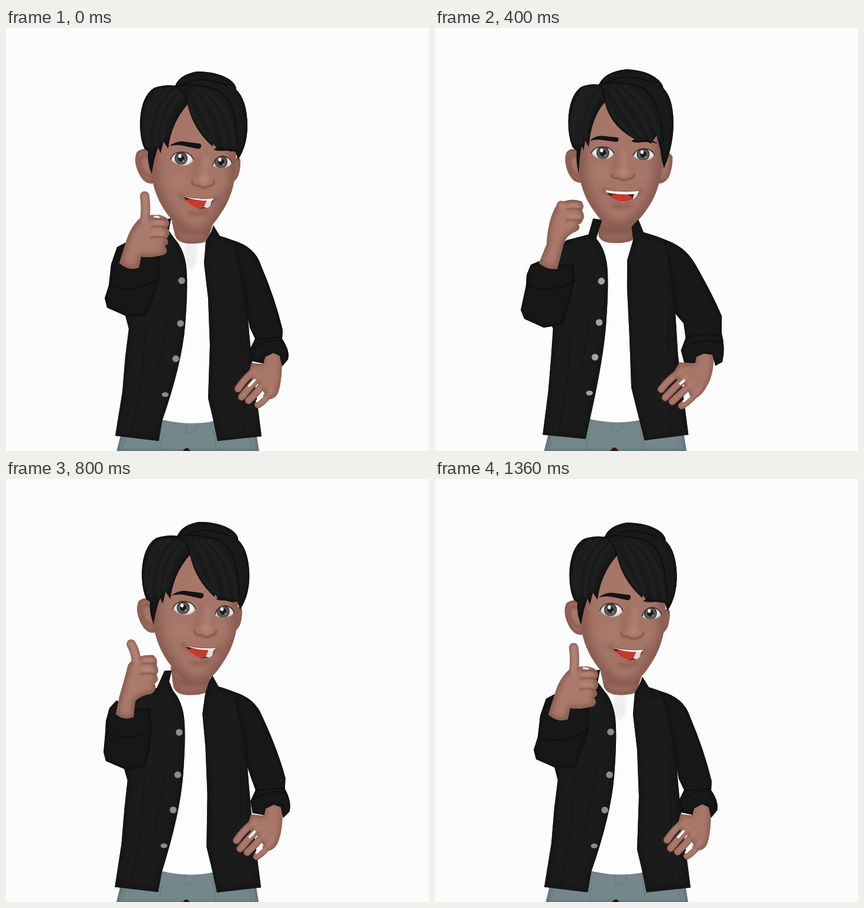
An HTML page with a canvas that plays this animation: 720x720 px, repeating every 1.44 s.

```html
<!DOCTYPE html>
<html lang="en">
<head>
<meta charset="utf-8">
<title>Thumbs up</title>
<style>
html, body { margin: 0; height: 100%; overflow: hidden; background: #fcfcfc; }
canvas { display: block; width: 100vw; height: 100vh; }
</style>
</head>
<body>
<canvas id="stage" width="720" height="720"></canvas>
<script>
const ctx = document.getElementById('stage').getContext('2d');
const LOOP = 1440, STEP = 80;

// Motion tracks, one value per time in TIMES
const TIMES = [0, 160, 240, 400, 640, 800, 1040, 1360, 1440];
const TRACKS = {
  body:  [0, 1.08, 1, .9, .46, .24, .06, 0, 0],
  bodyY: [0, 0, 0, 0, 0, 1, 1.5, .5, 0],
  head:  [0, 1.04, 1, .65, -.02, -.03, -.02, 0, 0],
  headX: [0, 0, 0, 2, 3, 3, 3, .7, 0],
  headY: [0, 0, 0, -3, -5, -3, 1.5, .5, 0],
  arm:   [0, 1, 1, 2, 3, 4, 4.8, 5, 5],
  armY:  [0, 0, 0, 0, 0, 0, 5, 1, 0]
};

// Each torso part: turned pose, front pose
const TORSO = {
  pants: ['M196 690L188 722L431 722L426 690L352 664L264 664Z',
          'M193 690L185 722L428 722L423 690L348 664L260 664Z'],
  seams: ['M306 674L308 690Q326 688 327 674M268 690Q262 706 264 722M352 684Q358 704 358 722M204 698L196 722M414 698L420 722',
          'M300 672L302 688Q320 686 321 672M262 690Q256 706 258 722M348 684Q354 704 354 722M201 698L193 722M411 698L417 722'],
  notch: ['M300 722Q308 708 315 722Z', 'M297 722Q305 706 313 722Z'],
  tee: ['M284 358L342 358L354 669Q312 678 262 666Z', 'M272 356L342 356L349 667Q306 676 260 665Z'],
  neck: ['M280 318L287 350Q290 367 315 367Q341 367 343 360L356 322Z',
         'M281 318L277 350Q278 366 305 366Q336 366 340 355L338 318Z'],
  left: ['M281 324L270 326L255 356L230 358L204 366L185 420L209 512L203 560L198 620L186 694L260 703L266 668Q300 570 305 505Q311 430 306 400Q301 374 288 360L277 345Z',
         'M285 327L269 324L262 351L225 361L190 379L168 432L200 512L197 560L192 620L183 692L256 699L263 668Q286 560 290 500Q295 430 291 400Q287 374 273 358L280 340Z'],
  right: ['M353 336L364 354Q400 364 420 382L408 440L414 520L419 570L435 695L360 703L352 664L344 630L347 540L344 460L337 400L340 364L350 345Z',
          'M345 324L354 347Q398 359 422 376L405 430L409 487L413 555L431 692L356 702L347 666L333 610L329 520L325 440L326 395L337 360L333 338Z'],
  folds: ['M283 358Q276 358 275 352M342 364L376 372L362 352M238 500L232 590L214 690M400 480L404 690M276 490L255 600',
          'M273 362Q266 356 262 351M336 362L372 371L354 347M230 500L226 590L210 690M396 480L400 690M262 490L246 600'],
  sleeve: ['M385 361Q424 372 434 404Q458 460 471 514L470 529Q484 550 480 564L470 576L466 558L455 553L441 560L438 571L418 567L415 547L424 529L415 510L411 488L406 450Z',
           'M390 360Q424 370 443 400Q476 456 490 488L490 518Q496 546 490 569L478 575L473 556L458 554L445 560L443 571L425 570L419 549L427 527L424 502L409 486L403 430Z'],
  cuff: ['M424 530Q445 529 470 526M419 546Q445 528 471 532', 'M427 527Q446 518 488 523M421 546Q452 526 490 536'],
  palm: ['M436 572L439 552L455 545L469 552Q471 592 465 615Q461 632 446 632L430 606L412 592L418 570Z',
         'M443 572L443 552L458 546L475 552Q476 588 463 608Q452 628 438 632L422 606L402 592L416 569Z'],
  fingers: ['M425 582Q408 594 395 614M432 592Q416 610 401 628M441 602Q426 622 413 634M454 612Q444 632 429 641',
            'M422 582Q400 594 384 615M430 592Q408 610 391 629M440 602Q420 620 403 636M452 612Q436 632 419 643'],
  gaps: ['M423 599L414 609M436 627L427 635', 'M424 600L418 605M432 627L423 635']
};
const BUTTONS = [[299, 430, 281.5, 431], [297, 503, 277.5, 501], [289, 563, 270.5, 560], [271, 624, 262, 621]];

const HEAD = {
  earL: ['M250 214Q236 200 223 211Q216 226 226 247Q236 268 252 264Z', 'M243 218Q230 204 222 216Q216 228 224 250Q232 268 246 267Z'],
  earR: ['M388 224Q397 216 399 226Q399 242 395 252Q390 262 382 264Z', 'M380 220Q396 206 404 221Q405 240 396 260Q386 273 374 269Z'],
  face: ['M246 112L249 258Q256 296 282 326Q298 350 324 349Q346 347 364 318Q390 282 391 235L394 112Z',
         'M240 112L242 255Q246 290 272 322Q284 338 308 339Q334 338 350 316Q376 284 380 240L384 112Z'],
  inner: ['M241 218Q225 214 229 234Q234 250 245 252', 'M236 221Q223 219 227 238Q231 252 238 256'],
  nose: ['M316 260Q318 270 328 268Q337 275 346 269Q355 268 354 260', 'M289 247Q290 256 300 253Q309 260 317 254Q328 255 328 247'],
  bridge: ['M328 220Q322 240 318 254', 'M297 208Q294 232 291 242'],
  ridge: ['M340 222Q340 240 338 254', 'M309 208Q309 226 309 240'],
  smile: ['M296 284Q300 286 303 290M360 289Q358 294 354 295M312 315Q328 320 342 313', 'M277 274Q280 274 284 279M344 274Q342 276 337 280M294 300Q310 305 326 300'],
  mouth: ['M300 286Q326 293 355 290Q350 309 330 309Q312 306 300 286Z', 'M280 275Q309 279 341 275Q333 295 310 295Q290 294 280 275Z'],
  teeth: ['M300 284L355 288L351 294Q325 295 303 287Z', 'M280 273L341 273L336 281Q309 284 284 281Z'],
  side: ['M342 292L352 290L346 307L337 305Z', 'M336 277L341 276L336 288L333 288Z'],
  eyeL: ['M281 224Q283 212 300 211Q315 212 319 224Q314 234 300 234Q287 232 281 224Z', 'M256 212Q260 202 275 202Q290 203 294 212Q288 222 275 222Q261 221 256 212Z'],
  eyeR: ['M352 234Q355 220 369 218Q382 220 384 230Q380 238 366 238Q358 238 352 234Z', 'M326 213Q331 203 346 203Q360 204 364 213Q360 223 347 223Q333 222 326 213Z'],
  lidL: ['M280 224Q284 211 300 211Q315 212 319 224', 'M255 212Q260 202 275 202Q290 203 294 212'],
  lidR: ['M352 233Q356 219 369 218Q382 220 385 230', 'M326 213Q331 203 346 203Q360 204 365 213'],
  browL: ['M278 201Q288 193 300 193L331 197Q335 203 328 206L300 200Q290 198 278 201Z', 'M252 192Q260 183 272 183L297 185Q301 190 296 192L272 190Q262 189 252 192Z'],
  browR: ['M354 207Q358 201 368 203Q384 205 392 211Q380 208 370 209Q358 210 354 207Z', 'M321 190Q326 184 342 184Q360 185 369 194Q354 190 342 191Q328 193 321 190Z']
};
const IRISES = { eyeL: [298, 222, 276, 212], eyeR: [366, 228, 345, 213] };

const HAIR = {
  mass: ['M248 248Q240 228 242 210L236 206Q228 190 228 160Q230 116 252 102Q268 96 288 98Q296 79 325 74Q360 74 381 88Q392 96 392 105Q410 122 411 165Q411 200 395 224L391 212L389 209L383 210L360 205L352 197L352 202Q318 172 309 130Q281 162 276 205L268 193L263 213L259 203Q252 220 248 248Z',
         'M240 249Q236 228 238 212L230 203Q223 186 223 160Q224 116 244 101Q258 95 271 97Q281 74 323 70Q354 72 370 85Q382 94 384 103Q400 120 400 160Q401 200 384 248L380 232L377 205L371 170L368 194L358 189L348 192Q288 176 275 126Q253 152 251 203L246 192L244 208L242 200Q239 215 240 249Z'],
  strands: ['M309 122Q322 160 350 194M318 108Q340 140 358 200M328 106Q366 138 374 203M340 106Q384 136 388 204M300 110Q268 144 266 192M290 106Q252 138 256 200M276 104Q240 134 242 200M264 104Q234 130 235 185',
            'M276 118Q292 164 340 188M286 102Q310 150 352 186M296 98Q340 140 364 188M312 98Q362 134 374 180M270 106Q242 144 248 194M262 102Q234 138 242 196M254 102Q230 134 234 195M246 104Q228 130 229 185'],
  parts: ['M288 99Q322 92 362 106Q392 126 394 200M300 98Q330 78 376 98M309 130Q305 108 288 99',
          'M271 97Q306 86 346 102Q378 126 382 190M284 92Q320 74 366 94M275 126Q277 106 271 97']
};

// Raised arm poses: thumb up, drawn back, closed fist, thumb rising, thumb out
const HANDS = [
  'M193 400L203 368Q212 335 232 321Q268 313 276 327Q280 335 274 340Q282 351 273 358Q280 367 270 371Q278 381 268 386Q245 392 230 389L226 408Q208 414 193 400Z',
  'M162 460L170 435Q180 405 189 382Q205 358 238 364Q246 372 241 380Q247 390 239 396Q244 405 236 409Q240 420 226 426Q212 424 202 432L191 463Q176 466 162 460Z',
  'M177 400L190 368Q192 325 208 300Q230 288 249 295Q256 304 250 310Q257 322 250 329Q250 333 244 334Q250 343 236 348Q222 355 219 368L208 410Q190 412 177 400Z',
  'M181 388L192 350Q193 320 200 282Q215 268 240 271Q250 278 247 288Q252 298 247 307Q248 312 243 314Q250 325 238 331Q228 340 222 356L213 391Q198 397 181 388Z',
  'M187 400L193 370Q202 340 208 316Q222 298 251 300Q260 308 256 316Q262 327 256 333Q262 343 253 348Q258 360 246 366Q230 368 220 378L217 405Q200 412 187 400Z'
];
const THUMBS = ['M236 328Q239 306 236 286', 'M214 370Q213 357 213 348', 'M224 308Q218 303 215 302', 'M213 288Q209 278 208 273', 'M222 312Q221 294 213 281'];
const SLEEVES = [
  'M204 365L189 373L179 402L175 438L168 460L172 476L206 491L238 490L250 462L262 425L262 388L228 385Z',
  'M166 432L148 452L142 470L142 488L137 510L142 524L168 537L207 538L214 505L222 470L214 440L192 440Z',
  'M177 397L163 403L156 420L155 438L146 480L152 495L185 510L218 505L228 470L238 430L236 400L208 405Z',
  'M182 377L170 383L163 402L163 425L157 465L162 480L196 493L229 488L236 460L242 430L242 390L213 388Z',
  'M188 377L176 390L170 412L169 432L166 465L170 480L207 496L236 490L244 465L248 430L246 390L217 390Z'
];

const NUM = /-?\d+(\.\d+)?/g;
const lerp = (a, b, k) => a + (b - a) * k;
const numbers = path => path.match(NUM).map(Number);
function mix(a, b, k) {
  const end = numbers(b);
  let i = 0;
  return a.replace(NUM, n => lerp(+n, end[i++], k).toFixed(2));
}
function poseAt(t) {
  let i = 0;
  while (t >= TIMES[i + 1]) i++;
  const k = (t - TIMES[i]) / (TIMES[i + 1] - TIMES[i]);
  return Object.fromEntries(Object.entries(TRACKS).map(([name, v]) => [name, lerp(v[i], v[i + 1], k)]));
}
const blend = (set, k) => Object.fromEntries(Object.entries(set).map(([name, pair]) => [name, mix(...pair, k)]));

function line(path, color, width) {
  ctx.strokeStyle = color;
  ctx.lineWidth = width;
  ctx.stroke(new Path2D(path));
}
function fill(path, color) {
  ctx.fillStyle = color;
  ctx.fill(new Path2D(path));
}
function inside(path, draw) {
  ctx.save();
  ctx.clip(new Path2D(path));
  draw();
  ctx.restore();
}
function soft(blur, draw) {
  ctx.save();
  ctx.filter = `blur(${blur}px)`;
  draw();
  ctx.restore();
}
function shaded(path, color, edge, width) {
  fill(path, color);
  inside(path, () => soft(width / 3, () => line(path, edge, width)));
}
function oval(x, y, rx, ry, color) {
  ctx.fillStyle = color;
  ctx.beginPath();
  ctx.ellipse(x, y, rx, ry, 0, 0, 7);
  ctx.fill();
}
function at(x, y, draw) {
  ctx.save();
  ctx.translate(x, y);
  draw();
  ctx.restore();
}

function drawTorso(k) {
  const p = blend(TORSO, k);
  shaded(p.pants, '#74878b', '#617276', 8);
  line(p.seams, '#65777b', 1.2);
  fill(p.notch, '#261715');
  fill(p.tee, '#fdfdfd');
  const shadow = Math.max(0, 1 - k * 5);
  inside(p.tee, () => soft(2, () => oval(314, 386, 11, 24, `rgba(215,215,215,${.4 * shadow})`)));
  shaded(p.neck, '#a07063', '#875a4f', 12);
  soft(5, () => oval(lerp(320, 308, k), 343, 28, 10, 'rgba(105,63,53,.45)'));
  for (const side of [p.left, p.right]) shaded(side, '#1b1b1b', '#151515', 12);
  line(p.folds, '#121212', 1);
  for (const [i, [x, y, x2, y2]] of BUTTONS.entries())
    oval(lerp(x, x2, k), lerp(y, y2, k), 5.8, i < 3 ? 5.8 : 4, k > .7 ? '#a2a2a2' : '#8c8c8c');
  line(p.fingers, '#87594e', 12.5);
  line(p.fingers, '#a07063', 10);
  shaded(p.palm, '#a87769', '#8d6054', 9);
  soft(2, () => line(p.fingers, '#b08072', 4));
  line(p.gaps, '#fcfcfc', 4);
  shaded(p.sleeve, '#181818', '#111', 6);
  line(p.cuff, '#0b0b0b', 1.2);
}

function drawEye(name, p, k) {
  const [x, y, x2, y2] = IRISES[name];
  const cx = lerp(x, x2, k), cy = lerp(y, y2, k);
  shaded(p[name], '#f3f1f0', '#c9c1be', 4);
  inside(p[name], () => {
    oval(cx, cy, 11, 11, '#3a3a3a');
    oval(cx, cy + 1, 9.5, 9.5, '#5b5b5b');
    oval(cx, cy, 5.5, 5.5, '#1c1c1c');
    oval(cx - 2, cy - 4, 2.6, 3.2, '#fff');
    oval(cx + 4, cy + 4, 1.6, 1.6, '#999');
  });
}

function drawFace(k) {
  const p = blend(HEAD, k);
  for (const ear of [p.earL, p.earR]) shaded(ear, '#a77769', '#87594e', 9);
  soft(2, () => line(p.inner, '#83564b', 4));
  shaded(p.face, '#a57568', '#885a4f', 22);
  const nx = lerp(337, 309, k), ny = lerp(258, 244, k);
  inside(p.face, () => soft(8, () => {
    oval(nx - 40, ny + 2, 20, 14, 'rgba(184,134,120,.35)');
    oval(nx + 34, ny + 4, 13, 13, 'rgba(184,134,120,.25)');
    oval(nx - 10, ny + 72, 20, 9, 'rgba(180,130,116,.35)');
    oval(nx - 6, ny - 80, 28, 24, 'rgba(174,126,112,.3)');
  }));
  soft(3, () => {
    line(p.bridge, 'rgba(112,70,60,.25)', 5);
    line(p.ridge, 'rgba(190,142,128,.5)', 7);
    oval(nx, ny, 9, 7, 'rgba(192,142,127,.6)');
    line(p.smile, '#815247', 4);
  });
  soft(1.2, () => line(p.nose, '#7b5045', 2.4));
  line(p.mouth, '#8b5950', 2.5);
  fill(p.mouth, '#5a1b18');
  inside(p.mouth, () => {
    oval(lerp(322, 309, k), lerp(299, 291, k), 20, 9, '#c33b2e');
    fill(p.side, '#dedcdc');
    fill(p.teeth, '#faf9f9');
    line(p.mouth, 'rgba(238,222,216,.7)', 1.6);
  });
  drawEye('eyeL', p, k);
  drawEye('eyeR', p, k);
  for (const lid of [p.lidL, p.lidR]) line(lid, '#3b2723', 1.5);
  for (const brow of [p.browL, p.browR]) fill(brow, '#141313');
}

function drawHair(k) {
  const p = blend(HAIR, k);
  shaded(p.mass, '#191a1a', '#121212', 7);
  inside(p.mass, () => {
    soft(1.5, () => line(p.strands, '#262727', 4));
    line(p.strands, '#131414', 1);
    line(p.parts, '#0e0e0e', 2);
  });
}

function drawArm(k) {
  const i = Math.min(4, Math.floor(k)), pose = set => mix(set[i], set[(i + 1) % 5], k - i);
  const sleeve = pose(SLEEVES), hand = pose(HANDS), thumb = pose(THUMBS);
  const s = numbers(sleeve), h = numbers(hand);
  shaded(sleeve, '#171717', '#101010', 6);
  line(`M${s[6]} ${s[7]}Q${(s[6] + s[18]) / 2} ${s[7] + 16} ${s[18]} ${s[19]}`, '#0a0a0a', 1.2);
  line(thumb, '#95675b', 16);
  shaded(hand, '#aa7a6c', '#8b5e52', 11);
  soft(1.5, () => line(thumb, '#b08072', 10));
  // Curled fingers lie between the outline's knuckle points
  const knuckles = [10, 14, 18];
  inside(hand, () => {
    soft(2.5, () => knuckles.forEach(n =>
      line(`M${h[n] - 22} ${h[n + 1] - 9}L${h[n] - 6} ${h[n + 1] - 8}`, '#b88979', 5)));
    soft(.8, () => knuckles.forEach(n =>
      line(`M${h[n] - 27} ${h[n + 1] - 1}Q${h[n] - 12} ${h[n + 1] - 4} ${h[n]} ${h[n + 1]}`, '#7d5146', 2)));
  });
  const gap = Math.max(0, 1 - Math.abs(k > 2.5 ? 5 - k : k) * 2);
  if (gap) line(`M${h[10] - 23} ${h[11] - 6}L${h[10] - 16} ${h[11] - 5}`, `rgba(252,252,252,${gap})`, 3);
}

function draw(t) {
  const p = poseAt(t);
  ctx.fillStyle = '#fcfcfc';
  ctx.fillRect(0, 0, 720, 720);
  ctx.lineCap = ctx.lineJoin = 'round';
  at(0, p.bodyY, () => drawTorso(p.body));
  at(p.headX, p.headY, () => drawFace(p.head));
  at(p.headX, p.headY * .4, () => drawHair(p.head));
  at(0, p.armY, () => drawArm(p.arm));
}

let shown = -1;
function tick() {
  const t = Math.floor(performance.now() % LOOP / STEP) * STEP;
  if (t !== shown) draw(shown = t);
  requestAnimationFrame(tick);
}
tick();
</script>
</body>
</html>
```
